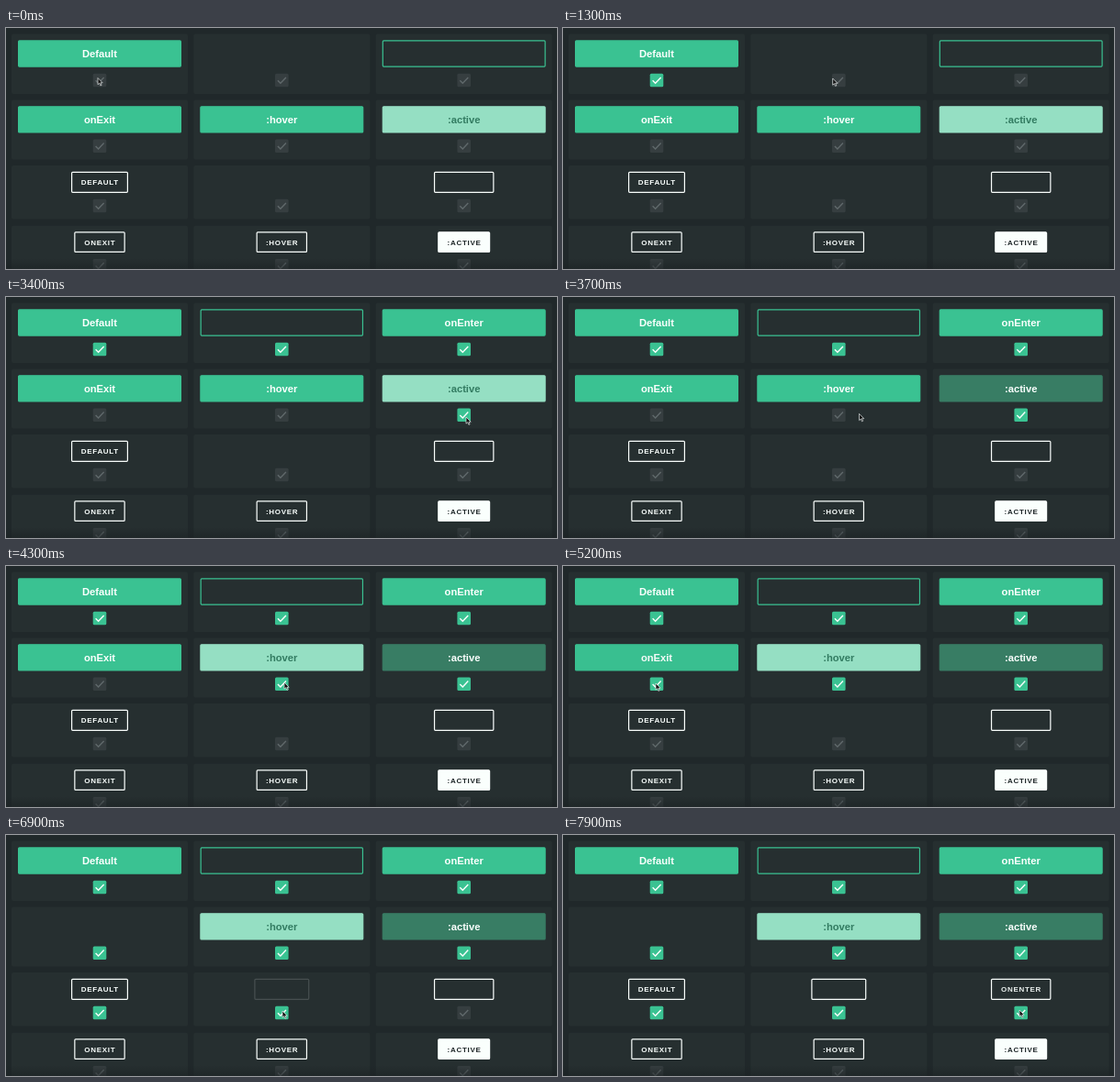
Write an HTML page that moves like this. It is 600 px wide and 263 px high and loops after 8 s.

```html
<!DOCTYPE html>
<html lang="en">
<head>
<meta charset="utf-8">
<title>Button states</title>
<style>
html, body { margin: 0; width: 100%; height: 100%; overflow: hidden; background: #20282a; }
svg { display: block; width: 600px; height: 263px; }
text { font: bold 11.2px "Liberation Sans", Arial, sans-serif; text-anchor: middle; }
text.small { font-size: 8px; letter-spacing: .7px; }
</style>
</head>
<body>
<svg id="stage" viewBox="0 0 600 263"></svg>
<script>
const LOOP = 8000;
const GREEN = [58, 194, 146], PALE = [149, 223, 195], DEEP = [56, 125, 100];
const WHITE = [250, 255, 253], INK = [50, 123, 97], DARK = [30, 38, 40];
const stage = document.getElementById('stage');

function add(tag, attrs, parent = stage) {
  const el = document.createElementNS('http://www.w3.org/2000/svg', tag);
  for (const k in attrs) el.setAttribute(k, attrs[k]);
  parent.append(el);
  return el;
}
const rgb = (c, a = 1) => `rgba(${c.map(Math.round)},${a})`;
const mix = (a, b, p) => a.map((v, i) => v + (b[i] - v) * p);
const progress = (t, start, length) => Math.min(1, Math.max(0, (t - start) / length));
const ease = p => p < .5 ? 4 * p ** 3 : 1 - 4 * (1 - p) ** 3;

const columns = [102, 300.3, 498.7];
const rows = [
  { top: 6.5, height: 65.5, button: 13.3, size: 29.4, text: 32.4, check: 57 },
  { top: 78.5, height: 65, button: 85.2, size: 29.4, text: 104.2, check: 128.7 },
  { top: 150, height: 58.5, button: 156.7, size: 23.2, text: 171.4, check: 194 },
  { top: 215.7, height: 60, button: 222.2, size: 22.8, text: 236.6, check: 259.3 }
];

// Each state: fill, fill alpha, text colour, text alpha, border alpha, opacity
const look = (fill, alpha, ink, inkAlpha = 1, border = 1, opacity = 1) =>
  ({ fill, alpha, ink, inkAlpha, border, opacity });
const solid = look(GREEN, 1, WHITE, 1, 0), line = look(GREEN, 0, WHITE, 0);
const gone = { ...solid, opacity: 0 };
const ghost = look(WHITE, 0, WHITE), empty = look(WHITE, 0, WHITE, 0);
const hide = s => ({ ...s, opacity: 0 });

// label, width, state before, state after, click time
const cells = [
  ['Default', 178, solid, solid, 300],
  ['', 177.5, hide(line), line, 1580],
  ['onEnter', 178, line, solid, 2580],
  ['onExit', 178, solid, gone, 5050],
  [':hover', 178, solid, look(PALE, 1, INK, 1, 0), 3820],
  [':active', 178, look(PALE, 1, INK, 1, 0), look(DEEP, 1, WHITE, 1, 0), 3300],
  ['DEFAULT', 62, ghost, ghost, 5680],
  ['', 60, hide(empty), empty, 6700],
  ['ONENTER', 65.5, empty, ghost, 7580],
  ['ONEXIT', 55.5, ghost, ghost],
  [':HOVER', 55.5, ghost, ghost],
  [':ACTIVE', 57, look(WHITE, 1, DARK), look(WHITE, 1, DARK)]
].map(([label, width, from, to, click = Infinity], i) => {
  const x = columns[i % 3], row = rows[i / 3 | 0], big = i < 6;
  add('rect', { x: x - 96, y: row.top, width: 192, height: row.height, rx: 2, fill: '#262f30' });
  const group = add('g', {});
  const box = add('rect', {
    x: x - width / 2 + .6, y: row.button + .6, width: width - 1.2, height: row.size - 1.2,
    rx: 1, 'stroke-width': 1.2
  }, group);
  const text = add('text', { x: x + (big ? 0 : .35), y: row.text, class: big ? '' : 'small' }, group);
  text.textContent = label;
  const check = add('rect', { x: x - 7.3, y: row.check - 7.3, width: 14.6, height: 14.6, rx: 1.5 });
  const tick = add('path', {
    d: `M${x - 4.4} ${row.check + .3}l3 3l6 -6.4`, fill: 'none', 'stroke-width': 1.4
  });
  return { from, to, click, big, group, box, text, check, tick };
});

const shade = add('linearGradient', { id: 'shade', x2: 0, y2: 1 }, add('defs', {}));
add('stop', { offset: 0, 'stop-color': '#1b2123', 'stop-opacity': 0 }, shade);
add('stop', { offset: 1, 'stop-color': '#1b2123', 'stop-opacity': .6 }, shade);
add('rect', { y: 251, width: 600, height: 12, fill: 'url(#shade)' });

const pointer = add('path', {
  d: 'M0 0V7.2L1.7 5.7L2.9 8.4L4.1 7.9L2.9 5.3H5.2Z',
  fill: '#111', stroke: '#e8eeee', 'stroke-width': .7, 'stroke-linejoin': 'round'
});

// start, end, x, y of the pointer's moves
const moves = [
  [0, 1, 100, 54.5], [850, 1420, 301, 55], [2000, 2500, 497, 57], [2880, 3260, 501, 131],
  [3460, 3800, 303, 127], [4550, 5000, 101, 128], [5280, 5620, 101, 196],
  [6050, 6600, 301, 192], [7100, 7550, 497, 191]
];

function drawCell(c, t) {
  const p = ease(progress(t, c.click + 100, 300));
  const on = progress(t, c.click, 100);
  const num = key => c.from[key] + (c.to[key] - c.from[key]) * p;
  c.group.setAttribute('opacity', num('opacity'));
  c.box.setAttribute('fill', rgb(mix(c.from.fill, c.to.fill, p), num('alpha')));
  const edge = c.big ? mix(c.from.fill, c.to.fill, p) : WHITE;
  c.box.setAttribute('stroke', rgb(edge, Math.max(num('border'), num('alpha'))));
  c.text.setAttribute('fill', rgb(mix(c.from.ink, c.to.ink, p), num('inkAlpha')));
  c.check.setAttribute('fill', rgb(mix([54, 62, 64], GREEN, on)));
  c.tick.setAttribute('stroke', rgb(mix([96, 105, 107], WHITE, on)));
}

function draw(now) {
  const t = now % LOOP;
  cells.forEach(c => drawCell(c, t));
  let at = moves[0].slice(2);
  for (const [start, end, ...to] of moves) at = mix(at, to, ease(progress(t, start, end - start)));
  pointer.setAttribute('transform', `translate(${at})`);
  requestAnimationFrame(draw);
}
const begin = performance.now();
requestAnimationFrame(function first(now) { draw(Math.max(0, now - begin)); });
</script>
</body>
</html>
```
